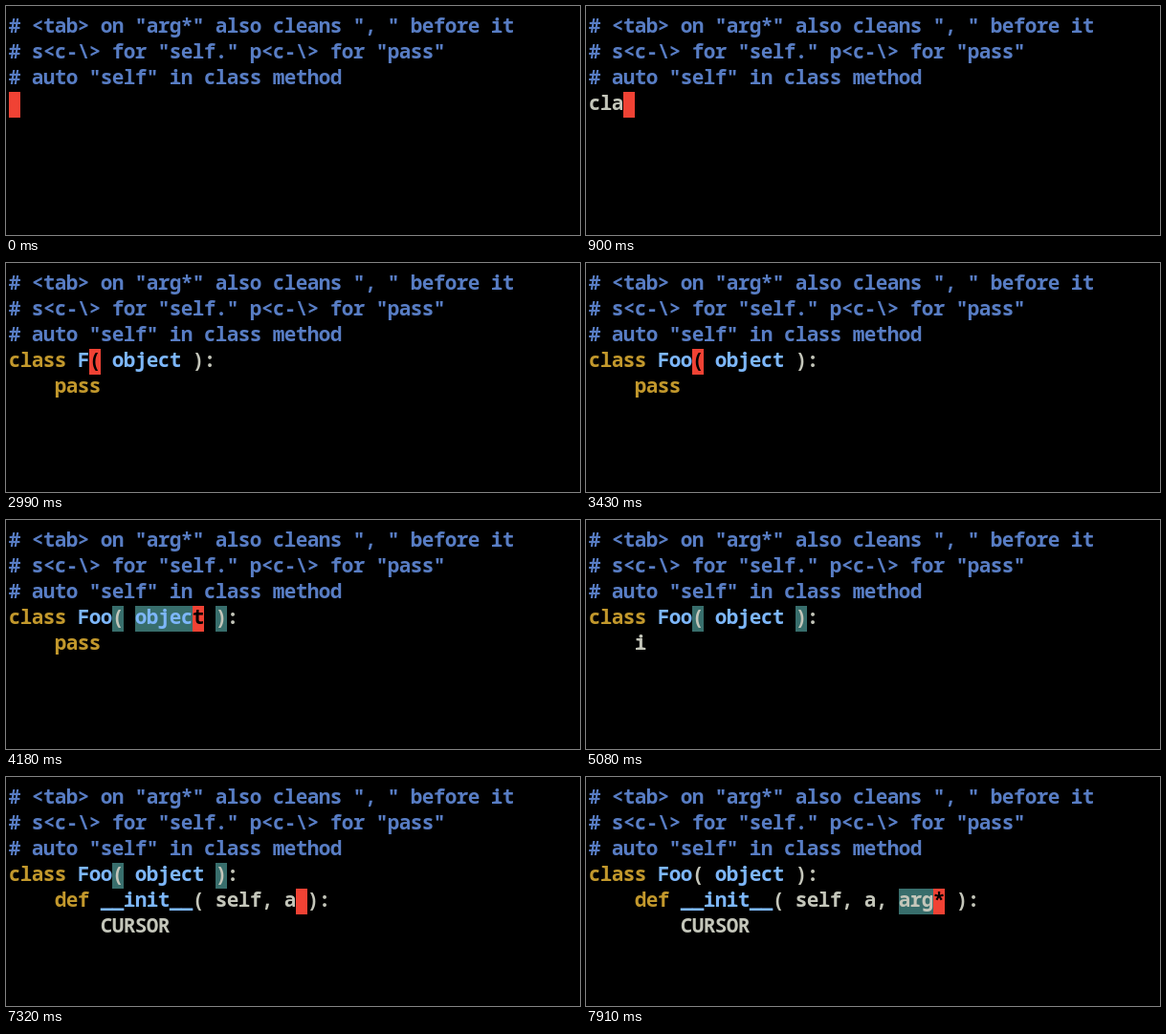
An HTML page that plays this animation: 600x240 px, repeating every 8 s.

```html
<!DOCTYPE html>
<html lang="en">
<head>
<meta charset="utf-8">
<title>Snippet typing</title>
<style>
  html, body { margin: 0; width: 100%; height: 100%; overflow: hidden; background: #000; }
  svg { display: block; width: 600px; height: 240px; }
  text {
    font: 600 21px "Noto Sans Mono", "DejaVu Sans Mono", monospace;
    letter-spacing: -0.6px;
    font-variant-ligatures: none;
    white-space: pre;
  }
</style>
</head>
<body>
<svg id="stage" viewBox="0 0 600 240" xmlns="http://www.w3.org/2000/svg">
  <rect width="600" height="240" fill="#000"/>
  <g id="notes"></g>
  <g id="code"></g>
</svg>
<script>
const LOOP = 8000;
const CELL = 12, LINE = 27, LEFT = 3, TOP = 9, BASE = 19, INSET = -0.3, FIRST = 3;
const COLOR = {
  note: "#587dc4", key: "#c2982c", name: "#7db7fa", plain: "#c4c6ba",
  mark: "#386e6c", cursor: "#f04234", under: "#000"
};

const notes = [
  '# <tab> on "arg*" also cleans ", " before it',
  '# s<c-\\> for "self." p<c-\\> for "pass"',
  '# auto "self" in class method'
];

const head = "class Foo( object ):";
const body = "    pass";
const init = args => `    def __init__( self, ${args} ):`;
const tail = "        CURSOR";
const parens = [[0, 9, 1], [0, 18, 1]];

// at: start in ms; cur: [row, column]; marks: [row, column, length]
const steps = [
  { at: 0,    rows: [""],    cur: [0, 0] },
  { at: 450,  rows: ["c"],   cur: [0, 1] },
  { at: 750,  rows: ["cl"],  cur: [0, 2] },
  { at: 900,  rows: ["cla"], cur: [0, 3] },
  { at: 1640, rows: ["class ClassName( object ):", body], cur: [0, 14], marks: [[0, 6, 9]] },
  { at: 2240, rows: ["class ClassName( object ):", body], marks: [[0, 6, 9]] },
  { at: 2990, rows: ["class F( object ):", body],  cur: [0, 7] },
  { at: 3290, rows: ["class Fo( object ):", body], cur: [0, 8] },
  { at: 3430, rows: [head, body], cur: [0, 9] },
  { at: 4030, rows: [head, body], marks: parens },
  { at: 4180, rows: [head, body], cur: [0, 16], marks: [...parens, [0, 11, 6]] },
  { at: 4630, rows: [head, body], cur: [1, 7],  marks: [...parens, [1, 4, 4]] },
  { at: 5080, rows: [head, "    i"], marks: parens },
  { at: 5220, rows: [head, "    i"],   cur: [1, 5], marks: parens },
  { at: 5370, rows: [head, "    in"],  cur: [1, 6], marks: parens },
  { at: 5520, rows: [head, "    ini"], cur: [1, 7], marks: parens },
  { at: 6120, rows: [head, init("arg*"), tail], cur: [1, 27], marks: [...parens, [1, 24, 4]] },
  { at: 7170, rows: [head, init("arg*"), tail], marks: [...parens, [1, 24, 4]] },
  { at: 7320, rows: [head, init("a"), tail], cur: [1, 25], marks: parens },
  { at: 7770, rows: [head, init("a"), tail] },
  { at: 7910, rows: [head, init("a, arg*"), tail], cur: [1, 30], marks: [[1, 27, 4]] }
];

const escapeText = s => s.replace(/&/g, "&amp;").replace(/</g, "&lt;");

function text(row, col, str, fill) {
  return `<text x="${LEFT + INSET + col * CELL}" y="${TOP + row * LINE + BASE}" fill="${fill}">${escapeText(str)}</text>`;
}

function box(row, col, len, fill) {
  return `<rect x="${LEFT + col * CELL}" y="${TOP + row * LINE}" width="${len * CELL}" height="${LINE}" fill="${fill}"/>`;
}

function tokenColor(word) {
  if (/^(class|def|pass|in)$/.test(word)) return COLOR.key;
  if (/^(ClassName|Fo{0,2}|object|__init__)$/.test(word)) return COLOR.name;
  return COLOR.plain;
}

function drawRow(str, row) {
  let out = "";
  for (const m of str.matchAll(/\w+|[^\w\s]+/g))
    out += text(row, m.index, m[0], tokenColor(m[0]));
  return out;
}

function drawStep({ rows, cur, marks = [] }) {
  let out = marks.map(([r, c, n]) => box(FIRST + r, c, n, COLOR.mark)).join("");
  out += rows.map((s, i) => drawRow(s, FIRST + i)).join("");
  if (cur) {
    const [r, c] = cur;
    out += box(FIRST + r, c, 1, COLOR.cursor);
    out += text(FIRST + r, c, rows[r][c] || "", COLOR.under);
  }
  return out;
}

const code = document.getElementById("code");
document.getElementById("notes").innerHTML =
  notes.map((s, i) => text(i, 0, s, COLOR.note)).join("");

const start = performance.now();
let shown = null;

function render(time) {
  const step = steps.findLast(s => s.at <= time);
  if (step === shown) return;
  shown = step;
  code.innerHTML = drawStep(step);
}

function tick() {
  render((performance.now() - start) % LOOP);
  requestAnimationFrame(tick);
}
tick();
</script>
</body>
</html>
```
